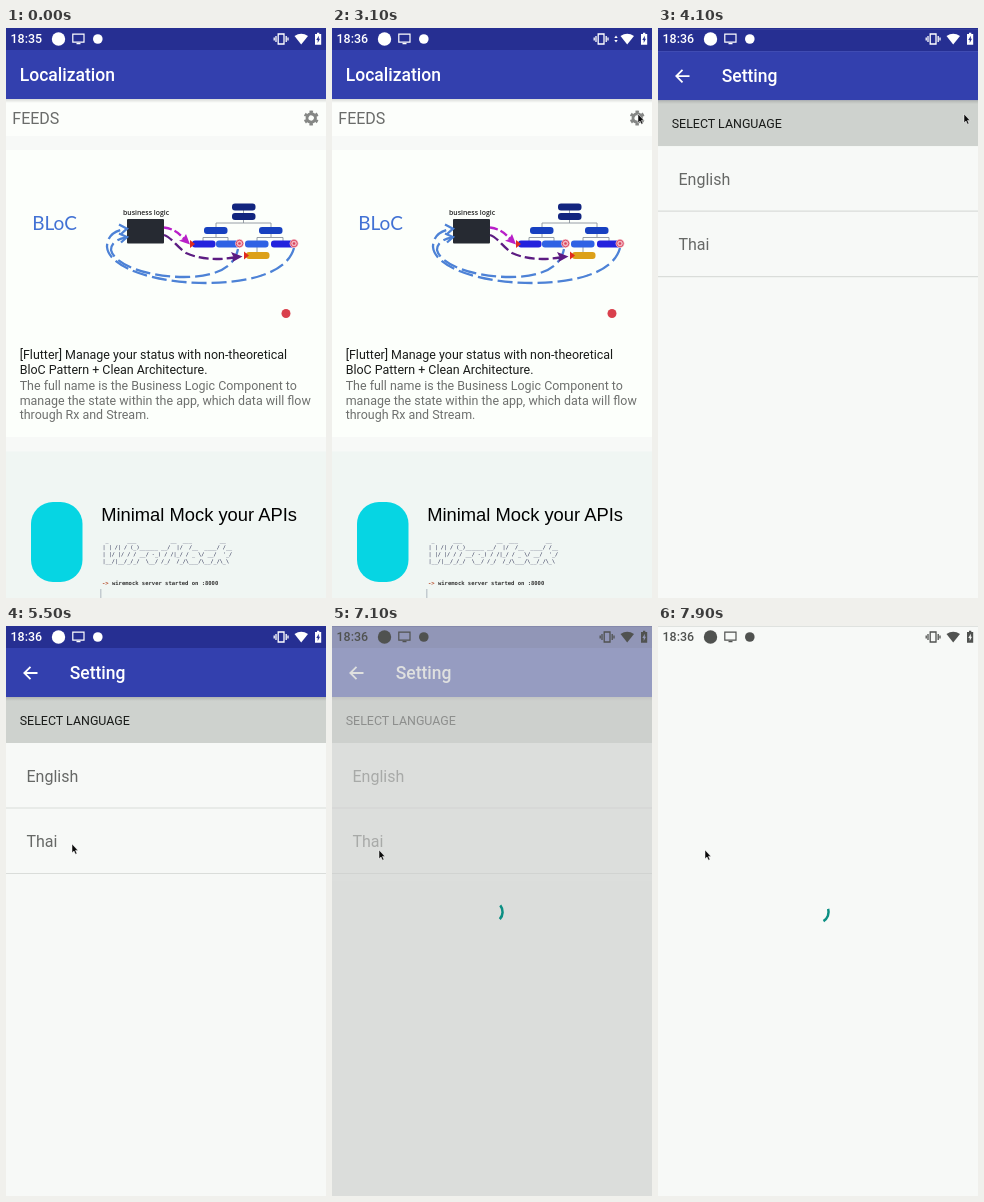
Recreate the animation shown at these times as an HTML page. Size 320 by 570 pixels, loop 8 s.

```html
<!DOCTYPE html>
<html lang="en">
<head>
<meta charset="utf-8">
<title>Localization</title>
<style>
html, body { margin: 0; width: 100%; height: 100%; overflow: hidden; background: #f7f9f7; }
svg { display: block; width: 100vw; height: 100vh; }
text { font-family: Roboto, sans-serif; white-space: pre; }
.bar { font-size: 17.5px; font-weight: 500; fill: #fff; }
.t { font-size: 12.44px; fill: #1a1c1a; }
.g { fill: #6e706e; }
.row { font-size: 16px; fill: #666866; }
.mono { font-family: "DejaVu Sans Mono", monospace; }
.line { fill: none; stroke-width: 2.3; }
</style>
</head>
<body>
<svg viewBox="0 0 320 570" preserveAspectRatio="none">
  <defs>
    <linearGradient id="shade" x2="0" y2="1">
      <stop offset="0" stop-color="#000" stop-opacity=".14"/>
      <stop offset="1" stop-color="#000" stop-opacity="0"/>
    </linearGradient>
    <clipPath id="thai"><rect y="182" width="320" height="65"/></clipPath>
    <g id="appbar">
      <rect width="320" height="22" fill="#262f92"/>
      <rect y="22" width="320" height="49" fill="#3340ae"/>
      <rect y="71" width="320" height="4" fill="url(#shade)"/>
    </g>
    <g id="target">
      <circle r="4.4" fill="#f3b9c4"/>
      <circle r="3.3" fill="none" stroke="#d8435c" stroke-width=".9"/>
      <circle r="1.3" fill="#d8435c"/>
    </g>
    <path id="flag" d="M0 -4L5 0L0 4Z" fill="#e02a1f"/>
  </defs>

  <g id="feed">
    <rect width="320" height="570" fill="#f7f9f7"/>
    <rect y="71" width="320" height="37" fill="#fcfefb"/>
    <rect y="122" width="320" height="287" fill="#fcfffb"/>
    <rect y="423.500" width="320" height="147" fill="#f0f6f3"/>
    <use href="#appbar"/>
    <text class="bar" x="13.7" y="53.3">Localization</text>
    <text x="6.3" y="96" font-size="16" fill="#6a6c6a">FEEDS</text>
    <g fill="none" stroke="#858785" transform="translate(305.2 90) rotate(30)">
      <circle r="4.2" stroke-width="3"/>
      <circle r="6.3" stroke-width="2.4" pathLength="12" stroke-dasharray="1 1" stroke-dashoffset=".5"/>
    </g>

    <text x="26.2" y="202" font-size="19" fill="#4272d4" style="font-family:Lato,sans-serif">BLoC</text>
    <text x="117" y="186.5" font-size="6.9" font-weight="600" fill="#222" style="font-family:'Open Sans',sans-serif">business logic</text>
    <rect x="121" y="191" width="37" height="24.500" rx="1" fill="#262a32"/>
    <path d="M237.500 180V195M210 200V195H265V200M210 205V209M197 214V209.500H222V214M265 205V209M251 214V209.500H277V214M251 218V225" fill="none" stroke="#8b949c" stroke-width=".9"/>
    <g id="tree"></g>
    <use href="#target" x="233.500" y="215.500"/>
    <use href="#target" x="288" y="215.500"/>
    <use href="#flag" x="184" y="216"/>
    <use href="#flag" x="238" y="227.500"/>
    <g class="line" stroke="#4d82d6">
      <path d="M288 220C281 246 240 255 200 255C150 255 103 240 101 219C101 207 110 202 120 201" stroke-dasharray="15 5"/>
      <path d="M232 221C228 242 205 249 178 249C140 249 108 236 105 222C105 215 111 211 120 209.500" stroke-dasharray="15 5"/>
      <path d="M113 196.500L121 200.700L114.500 206.500M113 205.500L121 209L115 214.500"/>
    </g>
    <path class="line" d="M158 199.500C168 201 173 205 179 212" stroke="#b81fc8" stroke-dasharray="8 3"/>
    <path d="M184 216.500L173 212.800L177 211L180 206Z" fill="#b81fc8"/>
    <path class="line" d="M158 207C165 209 170 218 180 225C195 232 213 232 228 229.500" stroke="#5c1c82" stroke-dasharray="10 4"/>
    <path d="M236.500 228.500L225 224L227.500 229L226.500 234Z" fill="#5c1c82"/>
    <circle cx="280" cy="285.500" r="4.5" fill="#d9404c"/>

    <text class="t" x="13.7" y="331">[Flutter] Manage your status with non-theoretical</text>
    <text class="t" x="13.7" y="345.500">BloC Pattern + Clean Architecture.</text>
    <text class="t g" x="13.7" y="362.200">The full name is the Business Logic Component to</text>
    <text class="t g" x="13.7" y="376.800">manage the state within the app, which data will flow</text>
    <text class="t g" x="13.7" y="391.300">through Rx and Stream.</text>

    <rect x="25" y="474" width="51.500" height="80" rx="22" fill="#06d5e3"/>
    <text x="95.200" y="493" font-size="18.35" fill="#000" style="font-family:'Liberation Sans',Arial,sans-serif">Minimal Mock your APIs</text>
    <g class="mono" id="banner" font-size="5.14" fill="#23264a"></g>
    <text x="96" y="557" font-size="5.52" font-weight="700" fill="#333"><tspan class="mono" fill="#b8502f">-&gt;</tspan><tspan class="mono"> wiremock server started on :8000</tspan></text>
    <rect x="94" y="561" width="1.500" height="9" fill="#c3cbd0"/>
  </g>

  <g id="setting">
    <rect width="320" height="570" fill="#f7f9f7"/>
    <rect y="71" width="320" height="46" fill="#ced2ce"/>
    <use href="#appbar"/>
    <path d="M31.500 47H18.500M24.500 40.800L18.300 47L24.500 53.200" fill="none" stroke="#fff" stroke-width="1.800"/>
    <text class="bar" x="63.7" y="53.3">Setting</text>
    <text class="t" x="13.7" y="99.300">SELECT LANGUAGE</text>
    <circle id="ripple" cx="47" cy="220" fill="#d1d6d1" clip-path="url(#thai)"/>
    <path d="M0 182H320M0 247.500H320" stroke="#dadddA" stroke-width="1.2"/>
    <text class="row" x="20.500" y="156">English</text>
    <text class="row" x="20.500" y="221">Thai</text>
  </g>

  <g id="blank">
    <rect width="320" height="570" fill="#f7f9f7"/>
    <rect width="320" height="1" fill="#dfe2df"/>
  </g>
  <rect id="dim" width="320" height="570"/>

  <g id="status" fill="currentColor">
    <text id="clock" x="4.500" y="15.400" font-size="12.44" font-weight="500"></text>
    <circle cx="52.500" cy="11" r="6.7"/>
    <path d="M66.800 6.200H78V14.200H66.800ZM70.500 15.700H74.500" fill="none" stroke="currentColor" stroke-width="1.200"/>
    <circle cx="91.800" cy="11" r="4.800"/>
    <path id="vibrate" d="M272.200 6H278V16H272.200ZM270 8V14M280.200 8V14M268.200 9.500V12.500M282 9.500V12.500" fill="none" stroke="currentColor" stroke-width="1.300"/>
    <path d="M288.500 8Q295.200 3.400 302 8L295.200 16.500Z"/>
    <path fill-rule="evenodd" d="M309 6H311V4.800H313.300V6H315.200V16.800H309ZM312.800 7.800L310.300 12H311.700V15L314 10.800H312.800Z"/>
    <path id="data" d="M282.300 10L284 7.500L285.700 10ZM282.300 12L284 14.500L285.700 12Z"/>
  </g>
  <path id="spin" fill="none" stroke="#0c8f83" stroke-width="2.500"/>
  <path id="cursor" d="M0 0V8.800L2 7L3.500 10.200L5 9.500L3.500 6.400H6Z" fill="#0a0a0a" stroke="#fff" stroke-width=".5"/>
</svg>
<script>
const LOOP = 8000;
const $ = id => document.getElementById(id);
const NS = 'http://www.w3.org/2000/svg';
const add = (parent, tag, attrs) => {
  const el = document.createElementNS(NS, tag);
  for (const k in attrs) el.setAttribute(k, attrs[k]);
  return parent.appendChild(el);
};
const show = (id, on) => { $(id).style.display = on ? '' : 'none'; };
const ramp = (t, a, b) => Math.min(1, Math.max(0, (t - a) / (b - a)));
const smooth = p => p * p * (3 - 2 * p);

// widget tree nodes: left, top, colour
[[226, 175.5, '#12257f'], [226, 185, '#12257f'],
 [198, 199, '#1741c0'], [253, 199, '#1741c0'],
 [186, 212.500, '#2322dd'], [210, 212.500, '#2f62e4'], [239, 212.500, '#2f62e4'], [265, 212.500, '#2322dd'],
 [240, 224, '#dca018']
].forEach(([x, y, fill]) => add($('tree'), 'rect', { x, y, width: 23.5, height: 7, rx: 3, fill }));

[' _      ___           __  ___         __',
 '| | /| / (_)______ __/  |/  /__  ____/ /__',
 '| |/ |/ / / __/ -_) / /|_/ / _ \\/ __/  \'_/',
 '|__/|__/_/_/  \\__/ /_/  /_/\\___/\\__/_/\\_\\'
].forEach((s, i) => {
  add($('banner'), 'text', { x: 96.5, y: 514 + i * 7, class: 'mono' }).textContent = s;
});

// cursor stops: time, x, y
const stops = [[1200, 179, 396], [1550, 174, 352.5], [1900, 174, 352.5], [2750, 306, 86],
               [4600, 306, 86], [5500, 66, 218], [5900, 54, 225], [6450, 47, 224]];
function cursorAt(t) {
  let i = 0;
  while (i < stops.length - 2 && t > stops[i + 1][0]) i++;
  const [a, x, y] = stops[i], [b, u, v] = stops[i + 1];
  const p = smooth(ramp(t, a, b));
  return [x + (u - x) * p, y + (v - y) * p];
}

// material standard curve, cubic-bezier(.4, 0, .2, 1)
function standard(x) {
  let lo = 0, hi = 1, s = 0;
  for (let i = 0; i < 20; i++) {
    s = (lo + hi) / 2;
    const q = 1 - s;
    if (1.2 * q * q * s + .6 * q * s * s + s * s * s < x) lo = s; else hi = s;
  }
  return s * s * (3 - 2 * s);
}

function arc(t) {
  const age = t - 6920, p = (age % 1333) / 1333;
  const turn = -80 + age * .2295;
  const tail = turn + 270 * standard(ramp(p, .5, 1));
  const head = turn + 270 * standard(ramp(p, 0, .5)) + 4;
  const at = d => {
    const a = d * Math.PI / 180;
    return (160 + 10.6 * Math.cos(a)).toFixed(2) + ' ' + (286 + 10.6 * Math.sin(a)).toFixed(2);
  };
  return `M${at(tail)}A10.6 10.6 0 ${head - tail > 180 ? 1 : 0} 1 ${at(head)}`;
}

function draw(t) {
  $('clock').textContent = t < 700 ? '18:35' : '18:36';
  $('status').style.color = t < 7000 ? '#fff' : '#505250';
  const busy = t >= 2900 && t < 3500;
  show('data', busy);
  $('vibrate').setAttribute('transform', `translate(${busy ? -6 : 0} 0)`);

  const open = ramp(t, 3680, 4270);
  show('setting', open > 0);
  $('setting').setAttribute('transform', `translate(0 ${(45 * (1 - open) ** 3).toFixed(2)})`);
  $('setting').setAttribute('opacity', ramp(t, 3680, 3900));

  show('ripple', t >= 6800);
  $('ripple').setAttribute('r', 222 + Math.max(0, t - 6800) * .9);
  $('ripple').setAttribute('opacity', 1 - ramp(t, 6900, 7080));

  $('blank').setAttribute('opacity', ramp(t, 6950, 7200));
  $('dim').setAttribute('opacity', .11 * ramp(t, 6930, 7060) * (1 - ramp(t, 7150, 7600)));

  show('spin', t >= 7000);
  if (t >= 7000) $('spin').setAttribute('d', arc(t));

  show('cursor', t >= 1200);
  $('cursor').setAttribute('transform', `translate(${cursorAt(t).map(n => n.toFixed(2)).join(' ')})`);
}

let begin;
function tick(now) {
  if (begin === undefined) begin = now;
  draw((now - begin) % LOOP);
  requestAnimationFrame(tick);
}
draw(0);
requestAnimationFrame(tick);
</script>
</body>
</html>
```
